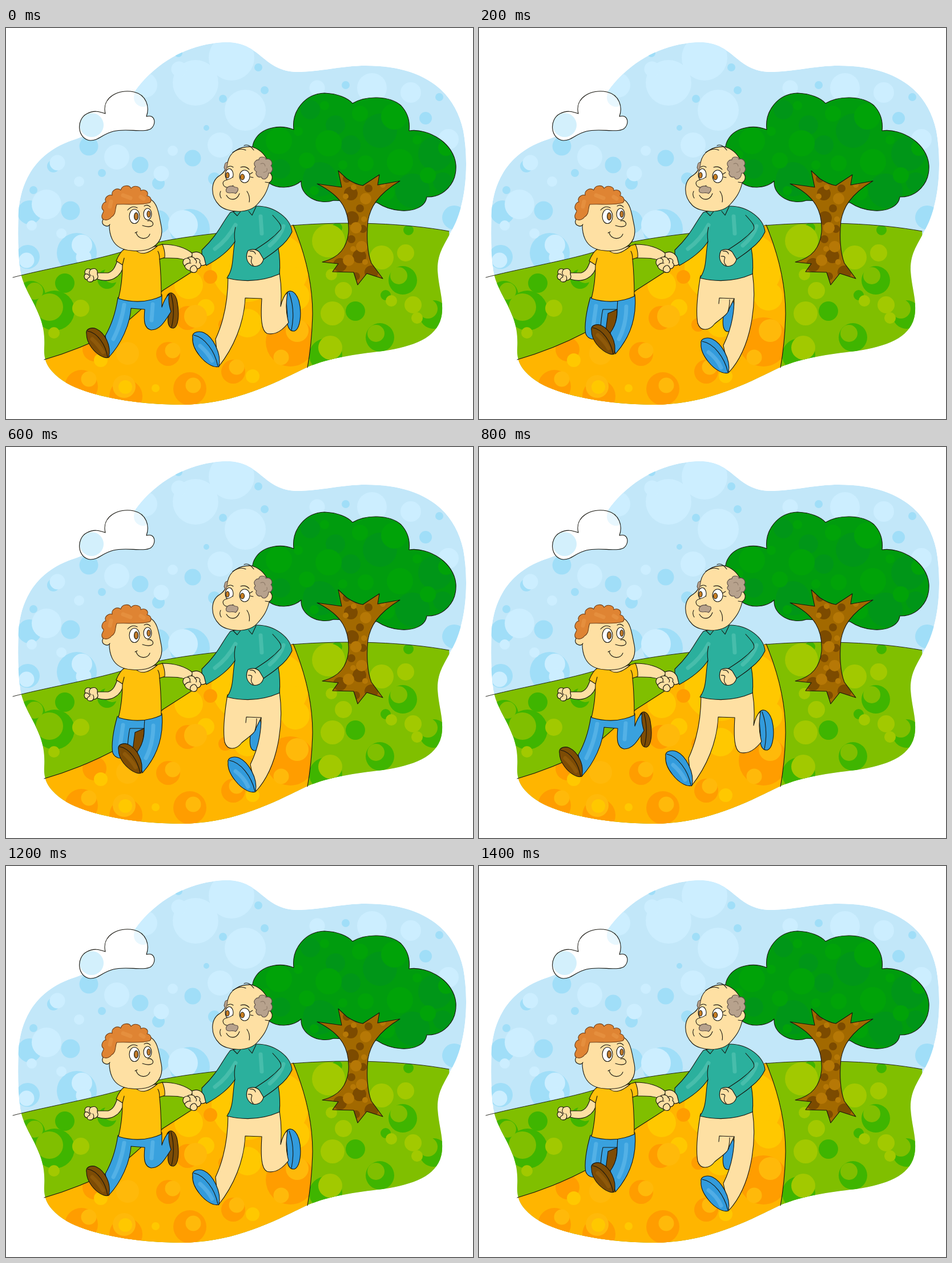
These frames come from a looping animation (818 by 685 pixels, 1.6 s). An HTML page without scripts:

```html
<!DOCTYPE html>
<html lang="en">
<head>
<meta charset="utf-8">
<title>A run in the park</title>
<style>
html,body{margin:0;width:100%;height:100%;overflow:hidden;background:#fff}
svg{display:block;width:100%;height:100%}
.ink{stroke:#17160f;stroke-width:1.1;stroke-linejoin:round;stroke-linecap:round}
.line{fill:none}
.dots{fill:none;stroke-linecap:round}
.soft{fill:none;stroke-linecap:round;stroke-width:7;opacity:.4}
.skin{fill:#fee0a3}
.jeans{fill:#39a1de}
.shoe{fill:#329bdc}
.boot{fill:#7d4c05}
.stride,.pass{animation:stride .4s step-end infinite}
.pass{animation-name:pass}
@keyframes stride{0%{visibility:visible}50%{visibility:hidden}}
@keyframes pass{0%{visibility:hidden}50%{visibility:visible}}
</style>
</head>
<body>
<svg viewBox="0 0 818 685">
<defs>
<path id="blob" d="M225 112C260 62 320 25 390 25C450 28 450 78 515 77C560 75 590 66 630 66C725 66 785 105 801 180C811 235 807 310 780 356C768 380 755 395 756 425C758 455 765 470 764 495C762 540 720 557 660 566C610 572 570 577 528 594C470 622 400 660 305 660C230 660 140 645 100 618C70 597 66 580 67 560C68 540 66 525 60 508C48 475 30 455 25 425C20 390 21 350 22 320C26 270 50 220 115 197C160 183 190 160 225 112Z"/>
<path id="hill" d="M12 437C60 424 150 408 200 393C260 373 315 366 375 359L500 346C600 338 700 342 776 356L800 700H0Z"/>
<path id="road" d="M67 581C105 570 147 554 187 533C220 512 245 482 276 459C310 437 355 410 402 372L503 345C526 400 537 450 537 500Q536 550 528 595L520 690H60Z"/>
<path id="leaves" d="M463 273C435 255 423 215 437 194C450 173 482 169 504 178C500 145 524 115 558 114C582 115 599 123 607 132C630 118 672 118 692 136C704 149 708 163 706 180C740 175 785 202 788 240C790 274 765 297 737 296C735 314 713 321 693 320C675 319 662 314 650 306L574 302C548 311 515 295 517 268C503 281 477 282 463 273Z"/>
<path id="trunk" d="M582 250L597 264Q612 274 625 276L654 257L651 275L690 268C650 292 638 315 634 338C631 365 633 395 640 412L660 439L632 430L616 450L609 428L572 427L582 413L554 410C585 402 597 384 600 358C602 322 590 295 545 273L588 279Z"/>
<path id="cloud" d="M147 197C125 194 122 160 142 150C155 143 165 147 174 150C167 122 197 106 224 112C246 117 252 138 246 155C262 150 264 170 253 177C240 184 210 175 188 181C168 186 162 198 147 197Z"/>
<clipPath id="inBlob"><use href="#blob"/></clipPath>
<clipPath id="inHill"><use href="#hill"/></clipPath>
<clipPath id="inRoad"><use href="#road"/></clipPath>
<clipPath id="inLeaves"><use href="#leaves"/></clipPath>
<clipPath id="inTrunk"><use href="#trunk"/></clipPath>
<clipPath id="inCloud"><use href="#cloud"/></clipPath>
</defs>

<g clip-path="url(#inBlob)">
  <use href="#blob" fill="#c2e7f9"/>
  <g class="dots" stroke="#a0def8">
    <path stroke-width="70" d="M124 394h0M322 352h0"/>
    <path stroke-width="42" d="M41 323h0M38 401h0M266 340h0M785 332h0"/>
    <path stroke-width="33" d="M145 207h0M113 320h0"/>
    <path stroke-width="29" d="M235 240h0M327 228h0"/>
    <path stroke-width="22" d="M83 242h0M735 158h0M365 264h0M267 272h0"/>
    <path stroke-width="14" d="M302 44h0M380 124h0M453 109h0M595 100h0M759 121h0M420 165h0M48 284h0M168 254h0M442 69h0M350 97h0"/>
    <path stroke-width="10" d="M368 37h0M414 57h0M351 175h0"/>
  </g>
  <g class="dots" stroke="#cceeff">
    <path stroke-width="80" d="M332 96h0M395 52h0"/>
    <path stroke-width="72" d="M419 144h0"/>
    <path stroke-width="52" d="M71 309h0M641 105h0M310 345h0"/>
    <path stroke-width="44" d="M375 205h0M194 226h0M243 100h0"/>
    <path stroke-width="36" d="M775 195h0M133 380h0M709 113h0"/>
    <path stroke-width="27" d="M90 236h0M272 255h0M303 72h0M36 407h0M545 105h0M136 402h0"/>
    <path stroke-width="18" d="M292 215h0M128 269h0M45 346h0M97 360h0"/>
  </g>
  <use href="#hill" fill="#80bf00"/>
  <g clip-path="url(#inHill)" class="dots">
    <g stroke="#3fb500">
      <path stroke-width="70" d="M85 495h0"/>
      <path stroke-width="58" d="M560 573h0"/>
      <path stroke-width="50" d="M655 542h0M749 502h0M695 442h0M44 468h0"/>
      <path stroke-width="34" d="M612 496h0M177 440h0M103 447h0"/>
      <path stroke-width="18" d="M580 350h0M665 468h0M705 354h0"/>
    </g>
    <g stroke="#80bf00">
      <path stroke-width="48" d="M76 489h0"/>
      <path stroke-width="34" d="M739 492h0"/>
      <path stroke-width="30" d="M648 535h0M688 434h0M50 461h0M186 432h0"/>
    </g>
    <g stroke="#a2c900">
      <path stroke-width="58" d="M565 373h0"/>
      <path stroke-width="42" d="M572 500h0M658 402h0M568 560h0"/>
      <path stroke-width="30" d="M591 460h0M700 394h0M713 485h0M131 491h0"/>
      <path stroke-width="20" d="M570 432h0M720 508h0M84 534h0M675 478h0"/>
    </g>
  </g>
  <use href="#road" fill="#ffb500"/>
  <g clip-path="url(#inRoad)" class="dots">
    <g stroke="#ffc800">
      <path stroke-width="120" d="M420 420h0M470 420h0"/>
      <path stroke-width="50" d="M320 450h0M507 470h0M423 517h0"/>
      <path stroke-width="30" d="M350 490h0M510 405h0"/>
    </g>
    <g stroke="#ff9d00">
      <path stroke-width="86" d="M498 550h0"/>
      <path stroke-width="58" d="M210 645h0M132 628h0M322 632h0"/>
      <path stroke-width="42" d="M284 571h0M155 563h0M398 602h0M318 508h0"/>
      <path stroke-width="24" d="M384 520h0M358 436h0"/>
    </g>
    <g stroke="#ffb90a">
      <path stroke-width="40" d="M510 530h0M213 570h0M207 628h0M332 505h0"/>
      <path stroke-width="27" d="M328 626h0M145 615h0M292 565h0M404 594h0M482 577h0"/>
    </g>
    <g stroke="#ffc800">
      <path stroke-width="24" d="M166 582h0M432 610h0M209 629h0"/>
      <path stroke-width="14" d="M262 631h0"/>
    </g>
  </g>
</g>

<g class="ink line">
  <path stroke-width=".9" d="M12 437C60 424 150 408 200 393C260 373 315 366 375 359M500 346C600 338 700 342 776 356"/>
  <path d="M67 581C105 570 147 554 187 533C220 512 245 482 276 459C310 437 355 410 402 372M503 345C526 400 537 450 537 500Q536 550 528 595"/>
</g>

<use href="#cloud" fill="#fff"/>
<g clip-path="url(#inCloud)" class="dots" stroke="#d3f0fc">
  <path stroke-width="42" d="M150 170h0"/>
  <path stroke-width="32" stroke="#e8f7fe" d="M240 122h0"/>
</g>
<use href="#cloud" class="ink line"/>

<use href="#leaves" fill="#009c0e"/>
<g clip-path="url(#inLeaves)" class="dots">
  <g stroke="#009618">
    <path stroke-width="60" d="M655 180h0M752 220h0M550 265h0M712 285h0"/>
    <path stroke-width="34" d="M533 143h0M481 247h0M604 205h0M765 270h0M577 170h0"/>
  </g>
  <g stroke="#00a308">
    <path stroke-width="46" d="M565 202h0M680 155h0M478 198h0M690 235h0"/>
    <path stroke-width="28" d="M620 150h0M527 232h0M739 258h0M771 210h0M630 237h0M667 288h0"/>
    <path stroke-width="16" d="M558 136h0M512 181h0M720 196h0M590 240h0M455 222h0M540 285h0"/>
  </g>
</g>
<use href="#leaves" class="ink line"/>
<use href="#trunk" fill="#a26900"/>
<g clip-path="url(#inTrunk)" class="dots">
  <g stroke="#7c4b00">
    <path stroke-width="24" d="M604 290h0M619 400h0M585 415h0M606 333h0M640 428h0"/>
    <path stroke-width="14" d="M635 281h0M620 316h0M625 352h0M605 370h0M597 264h0M613 435h0"/>
  </g>
  <g stroke="#b67806">
    <path stroke-width="20" d="M630 299h0M613 350h0M623 383h0M600 407h0"/>
    <path stroke-width="10" d="M609 279h0M595 295h0M627 335h0M608 387h0M629 410h0M660 275h0"/>
  </g>
</g>
<use href="#trunk" class="ink line"/>

<!-- man: legs -->
<g class="ink stride">
  <path class="shoe" d="M490 466C498 455 508 463 513 478C519 500 515 528 505 531C495 532 491 520 493 505Z"/>
  <path class="skin" d="M389 434C389 480 381 515 367 545L372 594C399 560 417 517 419 473L448 474C446 508 447 530 457 535C472 539 484 530 495 516C489 495 491 480 493 463Q485 470 481 488Q484 460 479 429Z"/>
  <path class="shoe" d="M327 542C325 532 339 530 347 534C362 541 378 570 373 593C364 596 350 588 339 574C330 563 326 552 327 542Z"/>
  <path class="line" d="M329 538C348 542 366 566 371 592M496 464Q507 494 500 529"/>
  <path class="soft" stroke="#80c9f3" d="M340 557Q353 568 361 583"/>
</g>
<g class="ink pass">
  <path class="shoe" d="M431 480C440 470 447 474 447 490C446 512 444 532 435 532C428 531 426 520 428 505Z"/>
  <path class="skin" d="M388 434C382 470 380 500 383 517C388 533 404 530 413 518C425 508 437 501 438 492L447 474C447 507 439 534 428 556L438 603C477 560 487 485 479 429Z"/>
  <path class="line" d="M420 483L421 473L447 474M439 476Q439 488 436 497"/>
  <path class="shoe" d="M389 553C387 543 401 541 409 545C424 552 442 580 437 604C428 607 413 599 402 585C393 574 388 563 389 553Z"/>
  <path class="line" d="M391 549C411 552 430 577 436 603"/>
  <path class="soft" stroke="#80c9f3" d="M402 568Q417 579 424 595"/>
</g>

<!-- man: body -->
<g class="ink">
  <path fill="#2bb09d" d="M393 323C379 340 372 362 343 389Q342 407 351 416C375 403 392 388 401 374C396 398 400 420 387 438Q435 450 479 431Q481 408 477 386C489 377 496 368 501 357C499 335 472 311 437 312Z"/>
  <path class="soft" stroke="#71d0c1" d="M402 345Q388 371 366 387M446 330L448 360M486 347Q481 365 462 381"/>
  <path class="line" d="M401 374Q399 360 402 349M467 328C479 341 484 347 481 353C467 369 451 379 437 388L449 407C461 398 470 393 477 386M398 322L405 329L412 320M425 321L431 328L438 313"/>
  <path class="skin" d="M424 390C432 386 440 388 444 393L451 405C449 415 439 420 430 416C421 410 419 400 424 390Z"/>
  <path class="line" d="M424 400Q433 399 430 405Q428 411 433 416M427 391Q436 390 437 396"/>
  <path class="skin" d="M388 236C392 216 410 207 430 208C455 215 468 242 462 267C458 288 450 298 440 309C425 326 388 324 374 311C357 294 358 268 375 258C384 252 386 245 388 236Z"/>
  <path class="skin" d="M455 253C467 250 470 266 461 271L454 270"/>
  <path fill="#b7a28d" stroke="#5d5047" d="M437 243C431 236 439 230 443 231C443 224 455 225 455 230C464 227 469 238 464 241C470 247 464 256 460 254C459 265 450 268 447 261C440 263 436 255 439 252Q432 248 437 243Z"/>
  <path class="line" stroke="#8f7b69" d="M446 238Q453 235 454 242M451 253Q459 252 457 246"/>
  <path fill="#b7a28d" stroke="#5d5047" d="M388 235C381 236 384 242 382 244L384 250Q388 245 388 235Z"/>
  <ellipse fill="#fff" cx="418" cy="260" rx="9" ry="11"/>
  <ellipse fill="#fff" cx="391" cy="257" rx="7" ry="10.5"/>
  <ellipse fill="#c97e22" cx="414" cy="261" rx="3.5" ry="5"/>
  <ellipse fill="#c97e22" cx="388" cy="258" rx="3" ry="5"/>
  <path class="skin" d="M397 261C392 267 380 265 380 272C381 281 392 281 398 276"/>
  <path fill="#b7a28d" stroke="#5d5047" d="M397 277C388 276 384 282 386 287C390 292 397 286 402 290C407 286 409 279 402 279Z"/>
  <path class="line" d="M386 293C392 303 404 303 409 290M411 244Q420 241 426 248M388 244Q393 240 398 244M422 286Q428 295 426 305M376 286Q373 292 377 298M397 218Q410 209 420 214M417 206Q425 202 434 214M427 256L432 253M428 261L433 262"/>
</g>

<!-- boy: legs -->
<g class="ink stride">
  <path class="boot" d="M282 469C288 460 297 464 300 480C304 502 302 524 293 526C284 526 282 515 285 500Z"/>
  <path class="jeans" d="M196 472C192 499 185 520 174 539L180 577C202 553 217 520 219 491L243 493C241 514 242 526 254 529C271 529 279 512 289 497Q283 478 286 466Q278 473 273 489V467Z"/>
  <path class="soft" stroke="#7bc9f0" d="M207 485Q202 518 188 545M257 484L255 512"/>
  <path class="boot" d="M141 536C139 526 151 524 158 527C173 534 185 556 180 577C172 580 159 572 150 560C144 552 141 544 141 536Z"/>
  <path class="line" d="M143 531C161 534 175 556 178 577M289 466Q297 495 290 524"/>
  <path class="soft" stroke="#a76d13" d="M151 545Q162 555 170 568"/>
</g>
<g class="ink pass">
  <path class="jeans" d="M195 472C188 496 184 522 187 536Q192 547 205 545L236 540L242 493L250 480L220 470Z"/>
  <path class="boot" d="M226 500L242 493Q241 523 231 535L222 530Z"/>
  <path class="jeans" d="M242 493Q243 516 230 534L239 571C262 545 277 510 273 467L243 475Z"/>
  <path class="line" d="M213 526Q214 506 217 493L242 493"/>
  <path class="soft" stroke="#7bc9f0" d="M205 487L200 522M258 488Q258 520 245 545"/>
  <path class="boot" d="M197 530C195 520 207 518 214 521C229 528 242 550 237 571C229 574 216 566 206 554C200 546 197 538 197 530Z"/>
  <path class="line" d="M199 525C217 528 231 550 235 571"/>
  <path class="soft" stroke="#a76d13" d="M208 538Q220 549 227 561"/>
</g>

<!-- boy: body -->
<g class="ink">
  <path class="skin" d="M197 403C191 417 190 425 179 429L160 429V440C182 447 202 438 207 413Z"/>
  <path class="skin" d="M160 426C157 419 151 422 148 423C141 419 136 426 139 431C135 435 138 441 142 441C143 446 151 446 153 442C159 442 163 437 160 432Z"/>
  <path class="line" d="M148 423Q143 430 149 434M139 431Q145 430 147 436Q143 438 142 441M152 434Q155 438 153 442"/>
  <path class="skin" d="M273 379C295 379 314 384 328 396L318 408C304 402 292 403 276 403Z"/>
  <path class="skin" d="M326 394C335 390 343 394 347 402L350 414C342 420 335 412 326 409Z"/>
  <path class="skin" d="M318 403C309 404 308 412 313 417C314 424 321 424 323 426C329 431 335 428 335 422C342 421 343 414 339 411C342 405 334 402 331 405C329 400 321 400 318 403Z"/>
  <path class="line" d="M318 403Q324 405 322 411M313 417Q317 411 324 412M323 426Q321 419 328 416M335 422Q332 415 329 416M331 405Q335 408 333 412"/>
  <path fill="#ffc00a" d="M208 387C201 391 197 398 193 408L204 415Q204 446 197 474Q237 486 272 470Q272 435 269 405L278 402Q279 391 274 379L259 383Z"/>
  <path class="line" d="M204 415L207 403M269 405Q269 396 266 391"/>
  <path class="skin" d="M226 388Q240 404 265 382Z"/>
  <path class="skin" d="M182 330C178 359 184 388 220 390C260 394 277 373 272 347C268 329 266 306 253 300L190 308Z"/>
  <path class="skin" d="M183 333C170 326 164 343 173 346Q179 349 182 344"/>
  <path fill="#df8433" stroke="#70401a" d="M170 335C164 329 172 323 171 320C164 314 171 304 175 305C171 297 180 291 186 293C184 284 195 279 201 284C203 275 216 274 219 281C225 274 237 278 236 285C244 281 251 288 247 294C254 295 256 302 252 306C237 311 216 308 194 309C190 318 194 325 185 331Q178 339 170 335Z"/>
  <path class="soft" stroke="#eea04f" d="M182 313L184 304M205 293L218 298M236 296L241 299"/>
  <ellipse fill="#fff" cx="225" cy="330" rx="9" ry="12.5"/>
  <ellipse fill="#fff" cx="248" cy="326" rx="7" ry="10"/>
  <ellipse fill="#c07a2a" cx="228" cy="330" rx="3.5" ry="6.5"/>
  <ellipse fill="#c07a2a" cx="250" cy="326" rx="3" ry="5.5"/>
  <path class="skin" d="M239 346C250 350 260 348 257 341Q254 336 248 338"/>
  <path class="line" d="M228 359C232 371 248 372 252 361M226 359L230 357M213 319Q221 310 230 315M242 312Q248 308 253 314"/>
</g>
</svg>
</body>
</html>
```
